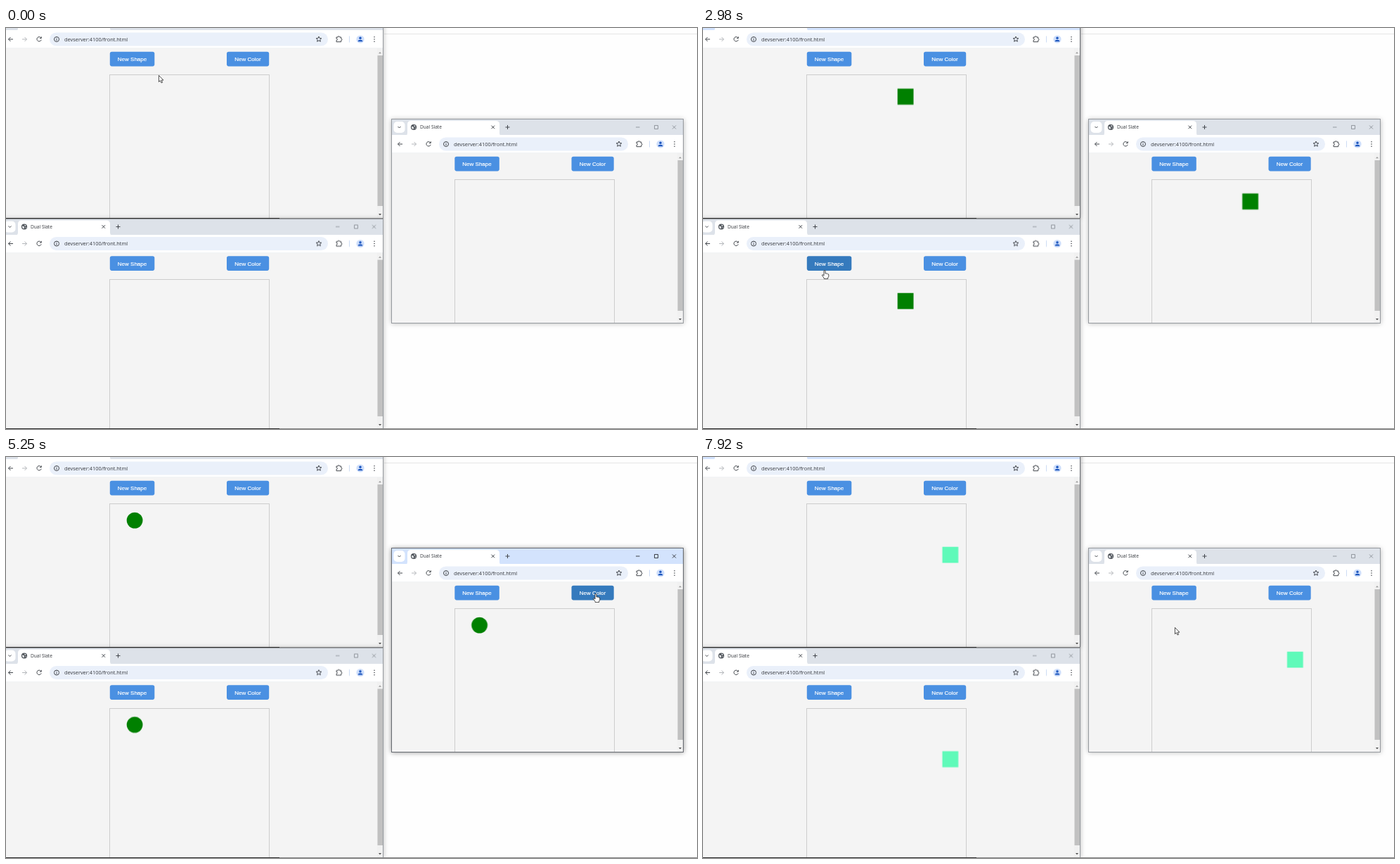
These frames come from a looping animation (983 by 570 pixels, 8 s). An HTML page:

```html
<!DOCTYPE html>
<html lang="en">
<head>
<meta charset="utf-8">
<title>Shared shapes</title>
<style>
html, body { margin: 0; width: 100%; height: 100%; overflow: hidden; background: #fefefe; }
svg { display: block; width: 983px; height: 570px; }
text { font-family: "Open Sans", "Noto Sans", sans-serif; fill: #33363b; }
.line { fill: none; stroke: #43474d; stroke-width: 1; }
.dim { stroke: #b4b7bb; }
.crisp, .edge, .bar { shape-rendering: crispEdges; }

/* One percent of the loop is 80 ms. */
.win, .btn, .shape, .arrow, .hand, .spot { animation: 8s step-end infinite; }
.win { --bar: #dde2e9; --ink: #8b9097; --edge: #969a9f; --glow: rgba(0,0,0,.28); }
.frame { fill: #f4f4f4; filter: drop-shadow(0 1px 3.5px var(--glow)); }
.edge { fill: none; stroke: var(--edge); }
.bar { fill: var(--bar); }
.ctl { fill: none; stroke: var(--ink); stroke-width: .9; }
.btn { fill: #4a90e2; }
.label { font: 8px "Liberation Sans", Arial, sans-serif; fill: #fff; stroke: #fff; stroke-width: .2; text-anchor: middle; }

#w1 { animation-name: focus1; }
#w2 { animation-name: focus2; }
#w3 { animation-name: focus3; }
#w1 .b1 { animation-name: hover1; }
#w2 .b1 { animation-name: hover2; }
#w2 .b2 { animation-name: hover3; }
#w3 .b1 { animation-name: hover4; }
#w3 .b2 { animation-name: hover5; }
.shape { animation-name: shape; }
.arrow { animation-name: arrow; }
.hand { animation-name: hand; }
.spot { animation-name: spot; fill: #ffe000; fill-opacity: .6; }
.pointer { animation: move 8s linear infinite; }

@keyframes focus1 {
  8.8%, 92.4%, 100% { --bar: #d3e3fd; --ink: #2b2e33; --edge: #666a70; --glow: rgba(0,0,0,.45); }
  0%, 41.3% { --bar: #dde2e9; --ink: #8b9097; --edge: #969a9f; --glow: rgba(0,0,0,.28); }
}
@keyframes focus2 {
  41.3%, 81.2% { --bar: #d3e3fd; --ink: #2b2e33; --edge: #666a70; --glow: rgba(0,0,0,.45); }
  0%, 56.6%, 92.4%, 100% { --bar: #dde2e9; --ink: #8b9097; --edge: #969a9f; --glow: rgba(0,0,0,.28); }
}
@keyframes focus3 {
  56.6% { --bar: #d3e3fd; --ink: #2b2e33; --edge: #666a70; --glow: rgba(0,0,0,.45); }
  0%, 81.2%, 100% { --bar: #dde2e9; --ink: #8b9097; --edge: #969a9f; --glow: rgba(0,0,0,.28); }
}
@keyframes hover1 { 1.9%, 90.2% { fill: #357abd; } 0%, 28.4%, 95.1%, 100% { fill: #4a90e2; } }
@keyframes hover2 { 36.5% { fill: #357abd; } 0%, 45.4%, 100% { fill: #4a90e2; } }
@keyframes hover3 { 77% { fill: #357abd; } 0%, 84.2%, 100% { fill: #4a90e2; } }
@keyframes hover4 { 53.7% { fill: #357abd; } 0%, 60.6%, 100% { fill: #4a90e2; } }
@keyframes hover5 { 63.6% { fill: #357abd; } 0%, 69.4%, 100% { fill: #4a90e2; } }
@keyframes hand {
  1.9%, 36.5%, 53.7%, 63.6%, 77%, 90.2% { opacity: 1; }
  0%, 28.4%, 45.4%, 60.6%, 69.4%, 84.2%, 95.1%, 100% { opacity: 0; }
}
@keyframes arrow {
  1.9%, 36.5%, 53.7%, 63.6%, 77%, 90.2% { opacity: 0; }
  0%, 28.4%, 45.4%, 60.6%, 69.4%, 84.2%, 95.1%, 100% { opacity: 1; }
}
@keyframes spot {
  8.8%, 24.9%, 41.3%, 56.6%, 66.6%, 81.2%, 92.4% { opacity: 1; }
  0%, 11.9%, 27.3%, 44.3%, 59%, 69.3%, 83.5%, 95%, 100% { opacity: 0; }
}
@keyframes shape {
  0% { opacity: 0; transform: translate(-19px, 278px); rx: 11.4px; fill: #008000; }
  10.8% { opacity: 1; transform: translate(-19px, 278px); rx: 11.4px; fill: #008000; }
  27.3% { opacity: 1; transform: translate(27px, 117.5px); rx: 0px; fill: #008000; }
  43.3% { opacity: 1; transform: translate(-64.5px, 135px); rx: 11.4px; fill: #008000; }
  58.6% { opacity: 1; transform: translate(-78px, 110px); rx: 11.4px; fill: #008000; }
  67.4% { opacity: 1; transform: translate(-78px, 110px); rx: 11.4px; fill: #fdb447; }
  83.2% { opacity: 1; transform: translate(-78px, 110px); rx: 11.4px; fill: #5ffab9; }
  94.2%, 100% { opacity: 1; transform: translate(90.75px, 159px); rx: 0px; fill: #5ffab9; }
}
@keyframes move {
  0% { transform: translate(217px, 67px); animation-timing-function: steps(3); }
  2.9%, 27.3% { transform: translate(198px, 45px); animation-timing-function: steps(2); }
  29.4% { transform: translate(206px, 73px); animation-timing-function: steps(7); }
  36.5%, 44.4% { transform: translate(173px, 344px); animation-timing-function: steps(6); }
  50.7% { transform: translate(653px, 213px); animation-timing-function: steps(4); }
  54.7%, 59.6% { transform: translate(662px, 196px); animation-timing-function: steps(4); }
  63.6%, 68.4% { transform: translate(839px, 194px); animation-timing-function: steps(8); }
  77%, 83.2% { transform: translate(345px, 332px); animation-timing-function: steps(7); }
  90.2%, 94.2% { transform: translate(182px, 45px); animation-timing-function: steps(5); }
  98.9%, 100% { transform: translate(671px, 242px); }
}
</style>
</head>
<body>
<svg viewBox="0 0 983 570">
  <rect width="983" height="570" fill="#fefefe"/>
  <rect x="538" y="8" width="445" height="1" fill="#e6e6e6"/>
  <g id="desk"></g>
  <g class="pointer">
    <circle class="spot" r="7"/>
    <path class="arrow" d="M.4 .4V9.6L2.5 7.7 4 11 5.6 10.3 4.1 7.1H6.9Z" fill="#fff" stroke="#222" stroke-width=".8"/>
    <path class="hand" d="M-1 1Q0-.4 1 1V5Q2 4.3 2.8 5.3 3.8 4.7 4.4 5.7 5.8 5.4 5.8 7V9.2L4.6 11V12.6H-.8V11.4L-3.4 8Q-3.7 6.5-2.4 6.8L-1 8Z" fill="#fff" stroke="#222" stroke-width=".8" stroke-linejoin="round"/>
  </g>
</svg>
<script>
const at = (x, y, body) => `<g transform="translate(${x} ${y})">${body}</g>`;
const line = (d, cls = "line") => `<path class="${cls}" d="${d}"/>`;
const dot = (x, y, r, fill) => `<circle cx="${x}" cy="${y}" r="${r}" fill="${fill}"/>`;
const box = (x, y, w, h, r, attrs) =>
  `<rect x="${x}" y="${y}" width="${w}" height="${h}" rx="${r}" ${attrs}/>`;

const globe = dot(0, 0, 4.1, "#50555b") +
  '<path d="M-2.9-1.2L-.6-.6 .2 1-.8 3-2.8 1.4ZM.6-3L2.6-1.8 1.6-.6 .2-1.4ZM1.6 .8L3 .6 2 2.4Z" fill="#e8eaed"/>';
const star = Array.from({ length: 10 }, (_, i) => {
  const r = i % 2 ? 1.8 : 4, a = i * Math.PI / 5;
  return `${(r * Math.sin(a)).toFixed(2)} ${(-r * Math.cos(a)).toFixed(2)}`;
}).join("L");
const person = dot(0, 0, 5.6, "#cfdffb") + dot(0, -1.7, 1.7, "#1b55bd") +
  '<path d="M-3.3 3.3V2.4Q-3 .9 0 .8 3 .9 3.3 2.4V3.3Z" fill="#1b55bd"/>';

const leftSide = w =>
  box(3.5, 4, 16, 16, 5, 'fill="#fff"') + line("M9.5 11L11.5 13 13.5 11") +
  '<path d="M20 24Q23 24 23 20V8Q23 3 28 3H149Q154 3 154 8V20Q154 24 157 24Z" fill="#fff"/>' +
  at(32, 12, globe) +
  '<text x="41" y="14.4" font-size="6.6">Dual Slate</text>' +
  line("M142.5 9.7L147 14.2M147 9.7L142.5 14.2") + line("M162.5 12H168.5M165.5 9V15") +
  line("M16 36H9.5M12.5 33L9.5 36 12.5 39") +
  line("M29 36H35.5M32.5 33L35.5 36 32.5 39", "line dim") +
  line("M55.8 34A3.2 3.2 0 1 0 56.2 36.8M56.3 32.3V34.6H54") +
  box(68, 26.5, w - 147, 19, 9.5, 'fill="#eaf0fa"') +
  '<circle class="line" cx="78" cy="36" r="3.5"/>' + line("M78 35.5V38M78 33.8V34.7") +
  '<text x="89" y="38.7" font-size="7.4">devserver:4100/front.html</text>';

const rightSide = h =>
  line("M-68 12H-62.5", "ctl") + line("M-41.5 9.5H-36.5V14.5H-41.5Z", "ctl") +
  line("M-16 9.5L-11 14.5M-11 9.5L-16 14.5", "ctl") +
  at(-92, 36, line(`M${star}Z`)) +
  line("M-67 33H-64.7Q-64.6 31.6-63.6 31.6T-62.5 33H-60.3V35.2Q-59 35.3-59 36.4T-60.3 37.6V39.7H-67V37.7Q-65.6 37.5-65.6 36.3T-67 35Z") +
  box(-49, 31.5, 1, 9, 0, 'fill="#cddcf3"') +
  at(-33, 36, person) +
  [32.8, 36, 39.2].map(y => dot(-13, y, .8, "#43474d")).join("") +
  box(-9, 49, 9, h - 49, 0, 'fill="#f1f1f1"') +
  box(-8.5, 59, 7.5, h - 76, 0, 'fill="#c1c1c1"') +
  '<path d="M-7 56.2H-3L-5 54Z" fill="#9a9a9a"/>' +
  `<path d="M-7 ${h - 6}H-3L-5 ${h - 3.8}Z" fill="#4d4d4d"/>`;

const page = h =>
  box(-113.2, 53.8, 63.5, 20.6, 2.8, 'class="btn b1"') + '<text class="label" x="-81.5" y="67.1">New Shape</text>' +
  box(53, 53.8, 60.2, 20.6, 2.8, 'class="btn b2"') + '<text class="label" x="83" y="67.1">New Color</text>' +
  `<path class="crisp" d="M-113.5 ${h}V86.5H113.5V${h}" fill="none" stroke="#cdcdcd"/>` +
  box(-11.3, -11.3, 22.8, 22.8, 0, 'class="shape"');

const win = (id, x, y, w, h) => `<g id="${id}" class="win" transform="translate(${x} ${y})">` +
  box(0, 0, w, h, 0, 'class="frame"') +
  box(0, 0, w, 24, 0, 'class="bar"') +
  box(0, 23, w, 26, 0, 'class="crisp" fill="#fff"') +
  box(0, 48.5, w, .5, 0, 'fill="#e3e6ea"') +
  leftSide(w) + at((w - 9) / 2, 0, page(h)) + at(w, 0, rightSide(h)) +
  box(.5, .5, w - 1, h, 0, 'class="edge"') + "</g>";

const rule = (y, end) =>
  box(0, y, 389, 1, 0, 'fill="#2c2c2c"') + box(389, y, end - 389, 1, 0, 'fill="#858585"');

document.getElementById("desk").innerHTML =
  win("w1", -6, -20, 543, 290) + win("w2", -6, 270.5, 543, 298.5) +
  rule(270, 537) + rule(569, 983) + win("w3", 548, 129, 416, 290);
</script>
</body>
</html>
```
